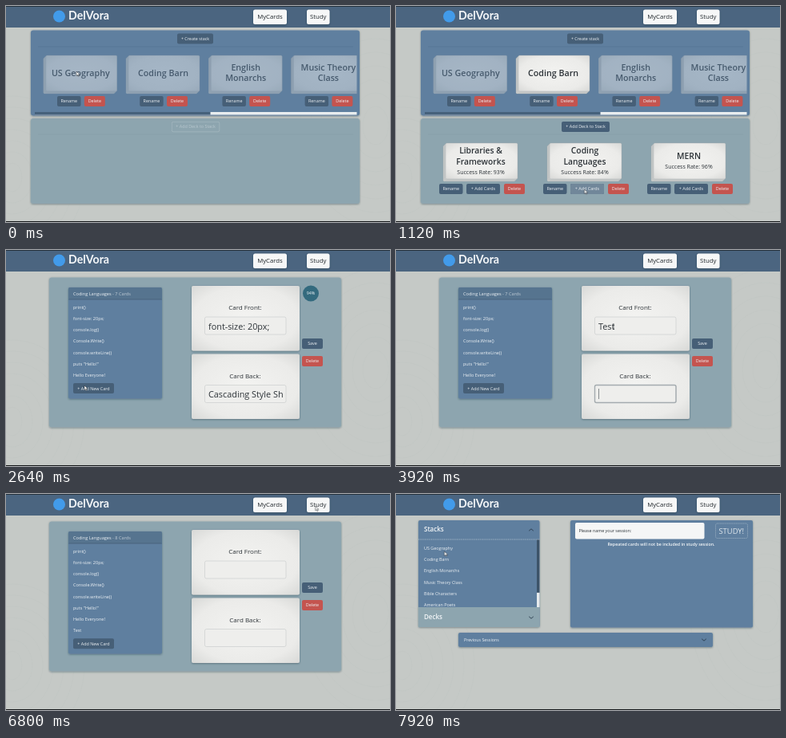
Recreate the animation shown at these times as an HTML page. Size 480 px wide and 271 px high, loop 8 s.

```html
<!DOCTYPE html>
<html lang="en">
<head>
<meta charset="utf-8">
<title>Flash cards</title>
<style>
html, body { margin: 0; width: 100%; height: 100%; overflow: hidden; background: #c5c9c6; }
svg { display: block; width: 100%; height: 100%; }
text { font-family: "Open Sans", "Noto Sans", sans-serif; }
.brand { font-family: Lato, sans-serif; font-weight: 700; }
.life { opacity: 0; animation: 8s step-end infinite; }
#pointer { animation: travel 8s ease-in-out infinite; }
@keyframes travel {
  0%, 1% { transform: translate(88px, 82px); }
  5%, 6.5% { transform: translate(196px, 86px); }
  13%, 17.5% { transform: translate(235.5px, 230px); }
  23.5%, 25.5% { transform: translate(104px, 85px); }
  32%, 34.5% { transform: translate(98px, 170px); }
  40%, 59% { transform: translate(272px, 96px); }
  64%, 67% { transform: translate(383px, 117px); }
  72%, 77% { transform: translate(132.5px, 150px); }
  86%, 91% { transform: translate(393px, 12px); }
  98%, 100% { transform: translate(60.5px, 72px); }
}
</style>
</head>
<body>
<svg id="stage" viewBox="0 0 480 271" preserveAspectRatio="none">
  <defs>
    <radialGradient id="paper" r=".75">
      <stop offset="0" stop-color="#f3f3f1"/>
      <stop offset=".65" stop-color="#ebebe9"/>
      <stop offset="1" stop-color="#d4d5d3"/>
    </radialGradient>
    <clipPath id="shelf"><rect x="36" y="55" width="402.5" height="76"/></clipPath>
    <clipPath id="field"><rect x="250" y="170" width="96.5" height="20"/></clipPath>
    <clipPath id="list"><rect x="28" y="57" width="151" height="85"/></clipPath>
    <filter id="shade" x="-10%" y="-10%" width="120%" height="125%">
      <feDropShadow dx="0" dy=".8" stdDeviation=".9" flood-color="#1d2c3a" flood-opacity=".45"/>
    </filter>
  </defs>
</svg>
<script>
const LOOP = 8000;
const BLUE = '#5f7f9f', MIST = '#8da5af', NAVY = '#465f77', RED = '#c4544f', INK = '#2d3338', PALE = '#eef2f5';
let rules = '', count = 0;

const rect = (x, y, w, h, fill, more = '') =>
  `<rect x="${x}" y="${y}" width="${w}" height="${h}" fill="${fill}" ${more}/>`;
const line = (x1, y1, x2, y2, color, more = '') =>
  `<path d="M${x1} ${y1}L${x2} ${y2}" stroke="${color}" stroke-width=".6" ${more}/>`;
const text = (x, y, str, size = 5.4, fill = PALE, more = '') =>
  `<text x="${x}" y="${y}" font-size="${size}" fill="${fill}" ${more}>${str.replace('&', '&amp;')}</text>`;
const mid = (x, y, str, size, fill, more = '') =>
  text(x, y, str, size, fill, 'text-anchor="middle" ' + more);
const panel = (x, y, w, h, fill, r = 3) => rect(x, y, w, h, fill, `rx="${r}" filter="url(#shade)"`);
const button = (x, y, w, str, fill = NAVY) =>
  rect(x, y, w, 13, fill, 'rx="2"') + mid(x + w / 2, y + 8.4, str);
const chevron = (x, y, d) =>
  `<path d="M${x - 2.8} ${y - d}l2.8 ${2 * d}l2.8 ${-2 * d}" fill="none" stroke="#27394a" stroke-width=".9"/>`;

// Shows the content only from a to b (ms)
function during(a, b, body) {
  const name = 'life' + count++, pc = t => t / LOOP * 100 + '%';
  rules += `@keyframes ${name}{0%{opacity:0}${pc(a)}{opacity:1}${pc(b)}{opacity:${b < LOOP ? 0 : 1}}}`;
  return `<g class="life" style="animation-name:${name}">${body}</g>`;
}

function pile(x, y, w, h, lines, rate) {
  let out = '';
  for (let i = 3; i >= 0; i--)
    out += rect(x + 3 - i, y + i, w - 3, h - 3, i ? '#d2d4d2' : 'url(#paper)', 'rx="1.5" stroke="#a4aaab" stroke-width=".4"');
  const cx = x + w / 2 + .5, size = rate ? 10.3 : 10.7;
  let base = rate ? (lines.length > 1 ? y + 13 : y + 19.5) : (lines.length > 1 ? y + 18.5 : y + 25.5);
  lines.forEach((s, i) => out += mid(cx, base + i * 13.7, s, size, INK, 'font-weight="600"'));
  if (rate) out += mid(cx, base + (lines.length - 1) * 13.7 + 12.3, `Success Rate: ${rate}%`, 7, INK);
  return out;
}

function backdrop() {
  let out = rect(0, 0, 480, 271, '#c5c9c6');
  for (let i = 0; i < 7; i++) {
    out += `<ellipse cx="462" cy="150" rx="${16 + i * 13}" ry="${24 + i * 17}" fill="none" stroke="#bbc1be" stroke-width=".6" opacity=".5"/>`;
    out += `<ellipse cx="8" cy="215" rx="${12 + i * 13}" ry="${18 + i * 14}" fill="none" stroke="#bbc1be" stroke-width=".6" opacity=".5"/>`;
  }
  return out;
}

function navbar() {
  const link = (x, w, s, fill) => rect(x, 4.5, w, 18.5, fill, 'rx="2.5" filter="url(#shade)"') + mid(x + w / 2, 15.7, s, 7.75, '#22282d');
  return rect(0, 0, 480, 27, '#4b6580') + rect(0, 0, 480, 1, '#26323d') + rect(0, 270, 480, 1, '#15181a') +
    '<circle cx="66.5" cy="13" r="7.5" fill="#429bea"/>' +
    text(78, 17.3, 'DelVora', 14.2, '#f3f6f8', 'class="brand"') +
    link(309, 42, 'MyCards', '#f6f7f7') + link(376, 28.5, 'Study', '#f6f7f7') +
    during(6880, 7360, link(376, 28.5, 'Study', '#dfe3e5'));
}

function stacksPage() {
  const stacks = [['US Geography'], ['Coding Barn'], ['English', 'Monarchs'], ['Music Theory', 'Class']];
  const dim = body => `<g opacity=".48">${body}</g>`;
  let shelf = '';
  stacks.forEach((names, i) => {
    const x = 46.8 + i * 103.2, card = pile(x, 62, 92, 48, names);
    shelf += i == 1 ? during(0, 480, dim(card)) + during(480, LOOP, card) : dim(card);
    shelf += button(x + 17.2, 113, 29.5, 'Rename') + button(x + 51, 113, 26, 'Delete', RED);
  });
  const decks = [[['Libraries &', 'Frameworks'], 93], [['Coding', 'Languages'], 84], [['MERN'], 96]];
  let open = button(207, 145, 60, '+ Add Deck to Stack');
  decks.forEach(([names, rate], i) => {
    const x = 59 + i * 130;
    open += pile(x, 172, 93, 48, names, rate) + button(x - 5, 223, 29.5, 'Rename') +
      button(x + 29, 223, 42, '+ Add Cards') + button(x + 76, 223, 26, 'Delete', RED);
  });
  open += during(960, 1440, button(218, 223, 42, '+ Add Cards', '#71879a'));
  const closed = `<g opacity=".45">${rect(207.3, 145.3, 59.5, 12.5, 'none', 'rx="2" stroke="#dfe6e9" stroke-width=".5"')}${mid(237, 153.4, '+ Add Deck to Stack')}</g>`;
  return panel(31, 30.5, 411, 107, BLUE) + button(214, 34.5, 45, '+ Create stack') +
    line(40, 51, 434, 51, '#527391') + `<g clip-path="url(#shelf)">${shelf}</g>` +
    rect(36, 133, 402.5, 3.5, '#e9edef') + rect(36, 133, 219.5, 3.5, '#46617b') +
    panel(31, 141, 411, 107, MIST) + line(40, 161, 434, 161, '#839ba6') +
    during(0, 480, closed) + during(480, LOOP, open);
}

function cardList(cards) {
  const n = cards.length, bottom = 87 + n * 14.2;
  return panel(78, 47, 117, bottom - 47, BLUE, 2) + rect(78, 47, 117, 15, '#56748f', 'rx="2"') +
    line(78, 62, 195, 62, '#3e566c') +
    text(84, 56.6, `Coding Languages <tspan fill="#c0ccd6">- ${n} Cards</tspan>`, 5.6) +
    cards.map((s, i) => text(84, 73.8 + i * 14.2, s, 5.5)).join('') +
    button(84, bottom - 19.3, 51, '+ Add New Card');
}

function editPage() {
  const cards = ['print()', 'font-size: 20px;', 'console.log()', 'Console.Write()', 'console.writeLine()', 'puts "Hello!"', 'Hello Everyone!'];
  const face = (y, label) => rect(232, y, 135, 81.5, 'url(#paper)', 'rx="2" filter="url(#shade)"') +
    mid(299, y + 30, label, 8, INK) +
    rect(248.5, y + 39, 101.5, 22, '#eeeeec', 'rx="2" stroke="#c6c9ca" stroke-width=".6"');
  const focus = y => rect(248.5, y, 101.5, 22, 'none', 'rx="2" stroke="#a4abaf" stroke-width="1.4"');
  const caret = (x, y) => rect(x, y, .6, 13, '#444b50');
  const value = (y, s) => text(253, y, s, 10.85, INK);
  const typed = (y, start) => [...'Test'].map((_, i) =>
    during(start + i * 80, i < 3 ? start + (i + 1) * 80 : 5360, value(y, 'Test'.slice(0, i + 1)))).join('');
  return panel(54, 34.5, 365, 188, MIST) +
    during(0, 5360, cardList(cards)) + during(5360, LOOP, cardList([...cards, 'Test'])) +
    face(45, 'Card Front:') + face(130.5, 'Card Back:') +
    button(370, 111, 26, 'Save') + button(370, 133, 26, 'Delete', RED) +
    during(2000, 2720, value(99.5, 'font-size: 20px;') +
      `<g clip-path="url(#field)">${value(184.8, 'Cascading Style Sheets')}</g>` +
      '<circle cx="381" cy="54.5" r="10" fill="#336a7e"/>' + mid(381, 56.4, '94%')) +
    during(3280, 3840, focus(84)) + during(3280, 3440, caret(253, 89)) + typed(99.5, 3440) +
    during(3840, 5280, focus(169.5)) + during(3840, 4400, caret(253, 174)) + typed(184.8, 4400);
}

function studyPage() {
  const names = ['US Geography', 'Coding Barn', 'English Monarchs', 'Music Theory Class', 'Bible Characters', 'American Poets'];
  const head = (y, s, d) => text(35, y, s, 8, '#f3f6f8', 'font-weight="600"') + chevron(169, y - 2.3, d);
  const menu = bottom => panel(28, 33, 151.5, bottom + 25 - 33, BLUE, 2) +
    head(47.3, 'Stacks', -1.2) + line(28, 57, 179.5, 57, '#c3d0db', 'stroke-dasharray="1 .6"') +
    rect(28, bottom, 151.5, 25, MIST) + head(bottom + 15.3, 'Decks', 1.2);
  const items = names.map((s, i) => text(35, 70 + i * 14.2, s, 5.4)).join('');
  return during(0, 7280, menu(68)) +
    during(7280, LOOP, menu(142) + `<g clip-path="url(#list)">${items}</g>` +
      rect(176, 57.3, 3.5, 84.7, '#e6eaec') + rect(176, 57.3, 3.5, 66.5, '#3c5369')) +
    panel(218, 33, 228, 134.5, BLUE, 2) + rect(224, 36, 161.5, 20.5, '#f5f6f6', 'rx="2"') +
    text(228.5, 48.2, 'Please name your session:', 5.35, INK) +
    rect(399.5, 37, 40, 18.5, 'none', 'rx="2" stroke="#a9bccc" stroke-width=".6" stroke-dasharray="1.2 .6"') +
    mid(419.3, 49.6, 'STUDY!', 9.4, '#dfe7ed') +
    mid(331.5, 65.2, 'Repeated cards will not be included in study session.', 5.3, '#f3f6f8', 'font-weight="600"') +
    panel(78, 174, 318, 18, BLUE, 2) + text(85, 185, 'Previous Sessions', 5.3) + chevron(385, 183, 1.2);
}

const hint = rect(0, 263, 5.5, 8, '#111') + text(.8, 268.6, '%', 4, '#ddd');
const arrow = '<path d="M0 0v5.6l1.4-1.2.9 2 .9-.4-.9-1.9h1.8z" fill="#fff" stroke="#20262b" stroke-width=".5"/>';
const beam = '<path d="M-1-3h2M0-3v6M-1 3h2" stroke="#30363a" stroke-width=".6"/>';

document.getElementById('stage').insertAdjacentHTML('beforeend',
  backdrop() + navbar() +
  during(0, 1440, stacksPage()) + during(1440, 7120, editPage()) + during(7120, LOOP, studyPage()) +
  during(1440, 1600, hint) + during(7120, 7280, hint) +
  `<g id="pointer">${during(0, 3200, arrow)}${during(3200, 4720, beam)}${during(4720, LOOP, arrow)}</g>`);
document.head.appendChild(document.createElement('style')).textContent = rules;
</script>
</body>
</html>
```
